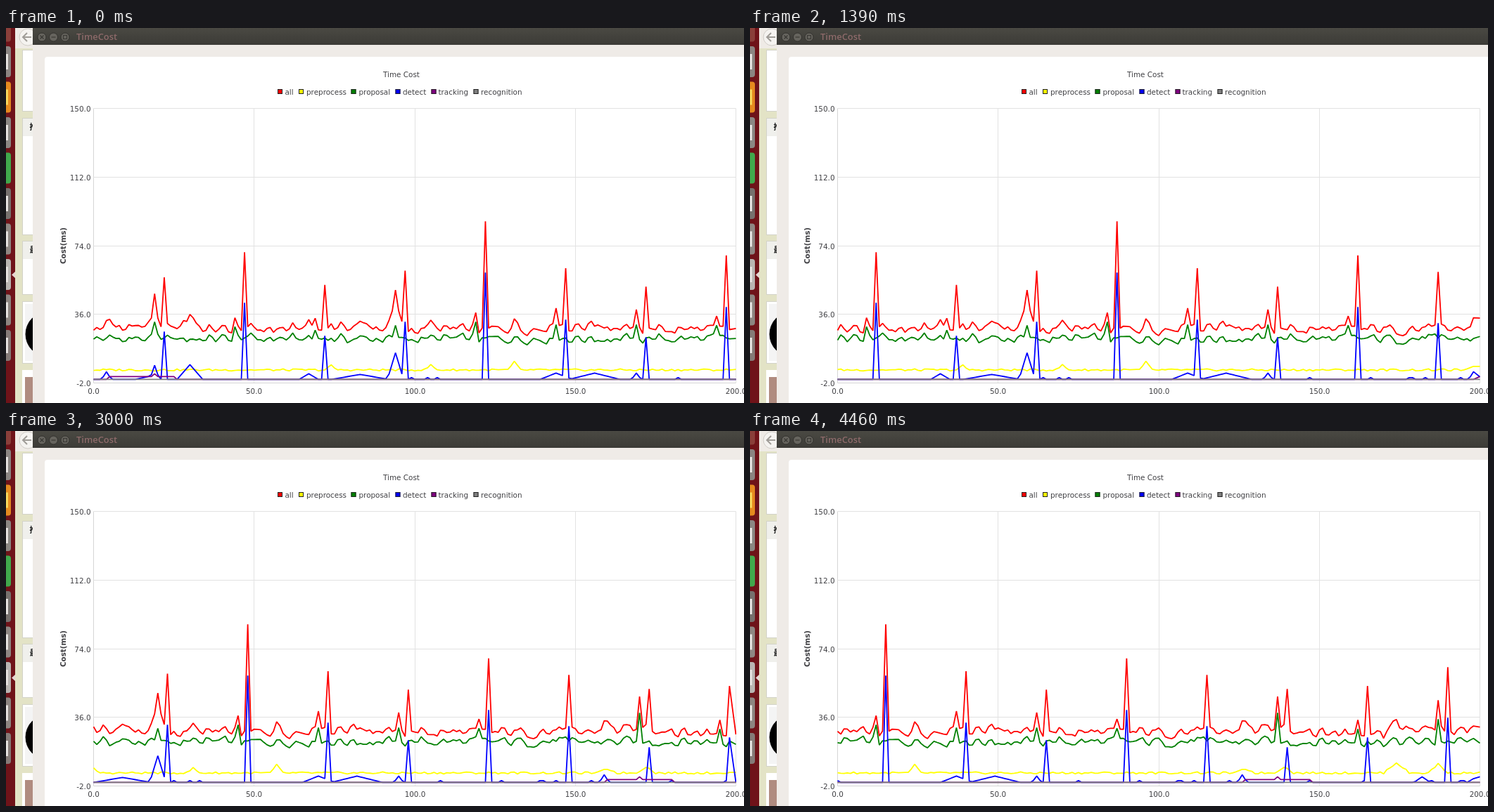
An HTML page with a canvas that plays this animation: 1049 by 534 pixels, repeating every 4.53 s.

```html
<!DOCTYPE html>
<html lang="en">
<head>
<meta charset="utf-8">
<title>TimeCost</title>
<style>
html, body { margin: 0; width: 100%; height: 100%; overflow: hidden; background: #fff; }
canvas { display: block; }
</style>
</head>
<body>
<canvas id="stage" width="1049" height="534"></canvas>
<script>
const ctx = document.getElementById('stage').getContext('2d');
const LOOP = 4530, SHOWN = 200, SCROLLED = 107, TOTAL = SHOWN + SCROLLED;
const LEFT = 124.5, RIGHT = 1037.5, TOP = 114.5, BOTTOM = 505.5, ZERO = 500.4;
const STEP = (RIGHT - LEFT) / 200;
const SANS = '"DejaVu Sans", sans-serif';
const CJK = 'bold 11px "Noto Sans CJK SC", "Noto Sans CJK", sans-serif';

// [time in ms, samples scrolled by then]
const scroll = [[0, 0], [40, 1], [870, 24], [1870, 47], [3000, 74], [3950, 96], [4460, SCROLLED]];

function scrolledAt(t) {
  const j = scroll.findIndex(k => t < k[0]);
  if (j < 0) return SCROLLED;
  const [t0, s0] = scroll[j - 1], [t1, s1] = scroll[j];
  return Math.floor(s0 + (s1 - s0) * (t - t0) / (t1 - t0) + 0.01);
}

// repeatable noise in -1..1
function noise(i, seed) {
  const v = Math.sin(i * 12.9898 + seed * 78.233) * 43758.5453;
  return (v - Math.floor(v)) * 2 - 1;
}

// Sample heights are in pixels above the zero line.
// Every 25 samples a full detection runs, three samples after a slow proposal.
const proposalPeaks = [82, 75, 70, 77, 82, 78, 78, 77, 64, 99, 76, 90];
const detectPeaks = [68, 109, 62, 82, 152, 85, 60, 103, 80, 50, 64, 92];

// [centre, half width, height]
const detectBumps = [[4, 1.5, 11], [17, 4, 4], [19, 1.5, 20], [30, 4, 21], [67, 3, 8], [83, 9, 7],
  [94, 2.5, 38], [144, 5, 9], [156, 8, 9], [169, 1.5, 9], [233, 1.5, 11], [289, 2.5, 8], [306, 3, 8]];
const preprocessBumps = [[74, 2, 6], [105, 2, 7], [131, 2, 11], [234, 3, 6], [246, 3, 9],
  [281, 4, 15], [294, 3, 13]];

function bump(list, i) {
  return Math.max(0, ...list.map(([c, w, h]) => h * (1 - Math.abs(i - c) / w)));
}

function proposal(i) {
  if (i % 25 === 19) return proposalPeaks[(i - 19) / 25];
  if (i % 25 === 22) return 59;
  return 58 + 4.5 * (noise(i, 1) + noise(i + 1, 1));
}

function detect(i) {
  if (i % 25 === 22) return detectPeaks[(i - 22) / 25];
  const idle = i > 98 && noise(i, 2) > 0.85 ? 2.5 : 0;
  return Math.max(idle, bump(detectBumps, i));
}

function tracking(i) {
  const k = i < 200 ? i - 15 : i - 244;
  if (Math.abs(k) > 10) return 0;
  return k === 0 && i > 200 || i === 19 ? 8 : 4;
}

const series = { all: [], preprocess: [], proposal: [], detect: [], tracking: [], recognition: [] };
for (let i = 0; i < TOTAL; i++) {
  const parts = {
    preprocess: 13.5 + 1.5 * noise(i, 3) + bump(preprocessBumps, i),
    proposal: proposal(i), detect: detect(i), tracking: tracking(i), recognition: 0
  };
  let sum = 0;
  for (const name in parts) {
    series[name].push(parts[name]);
    sum += parts[name];
  }
  series.all.push(sum);
}

// name, colour, marker centre, label start
const legend = [
  ['all', '#ff0000', 390, 396.5], ['preprocess', '#ffff00', 420, 427],
  ['proposal', '#008000', 494.5, 501.5], ['detect', '#0000ff', 557.5, 564],
  ['tracking', '#800080', 608.5, 614.5], ['recognition', '#808080', 668.5, 675]
];

function rect(x, y, w, h, color) {
  ctx.fillStyle = color;
  ctx.fillRect(x, y, w, h);
}

function roundRect(x, y, w, h, color) {
  ctx.fillStyle = color;
  ctx.beginPath();
  ctx.roundRect(x, y, w, h, 4);
  ctx.fill();
}

function disc(x, y, r, fill, stroke = fill) {
  ctx.beginPath();
  ctx.arc(x, y, r, 0, 7);
  ctx.fillStyle = fill;
  ctx.fill();
  ctx.strokeStyle = stroke;
  ctx.lineWidth = 1;
  ctx.stroke();
}

function line(color, width, ...p) {
  ctx.beginPath();
  for (let j = 0; j < p.length; j += 2) ctx.lineTo(p[j], p[j + 1]);
  ctx.strokeStyle = color;
  ctx.lineWidth = width;
  ctx.stroke();
}

function text(s, x, y, align = 'left', font = '10.4px ' + SANS, color = '#404044') {
  ctx.font = font;
  ctx.textAlign = align;
  ctx.fillStyle = color;
  ctx.fillText(s, x, y);
}

function drawDesktop() {
  rect(13, 0, 25, 534, '#e3e3c6');
  rect(13, 0, 25, 29, '#efebe6');
  disc(31, 13, 12, '#f5f3f0', '#d0ccc6');
  line('#a09d98', 2, 30, 7, 24, 13, 30, 19);
  line('#a09d98', 2, 24, 13, 36, 13);
  for (const [y, h] of [[31, 88], [128, 167], [303, 77], [389, 89]]) {
    rect(23, y, 15, h, '#d3d3c9');
    rect(24, y + 1, 14, h - 2, '#fff');
  }
  for (const [y, glyph] of [[129, '推'], [304, '最']]) {
    rect(24, y, 14, 25, '#f0f0ec');
    text(glyph, 33.5, y + 16, 'left', CJK, '#222');
  }
  rect(23, 487, 15, 47, '#fff');
  rect(27, 393, 11, 81, '#f4f4f4');
  disc(60, 436, 32, '#000');
  rect(27, 497, 11, 37, '#b08c80');
}

function drawLauncher() {
  rect(0, 0, 13, 534, '#6f1319');
  const tiles = ['#8a3f3a', '#8b8582', '#e58a1f', '#8b8783', '#41a94c', '#77716e',
    '#8f8783', '#b9b5b2', '#8d8581', '#857b78'];
  tiles.forEach((color, k) => {
    const y = -24.5 + 50.5 * k;
    roundRect(-20, y, 27, 44, color);
    if (k && k !== 4) rect(0, y + 11, 3, 22, k === 2 ? '#f7d75c' : '#e4e1df');
  });
  ctx.fillStyle = '#e6d5d2';
  ctx.beginPath();
  ctx.moveTo(13, 347);
  ctx.lineTo(8, 351.5);
  ctx.lineTo(13, 356);
  ctx.fill();
}

function drawWindow() {
  rect(38, 0, 1011, 534, '#efebe7');
  const bar = ctx.createLinearGradient(0, 0, 0, 24);
  bar.addColorStop(0, '#4a4943');
  bar.addColorStop(1, '#3c3b37');
  rect(38, 0, 1011, 24, bar);
  for (const x of [51, 67.5, 84]) disc(x, 13, 6, '#66645e', '#33322e');
  line('#3a3935', 1.2, 48.5, 10.5, 53.5, 15.5);
  line('#3a3935', 1.2, 53.5, 10.5, 48.5, 15.5);
  line('#3a3935', 1.2, 64.5, 13, 70.5, 13);
  ctx.strokeRect(81.5, 10.5, 5, 5);
  text('TimeCost', 100, 17, 'left', '600 12.9px "Open Sans", sans-serif', '#8d6a6a');
  roundRect(55, 41, 1020, 520, '#fff');
}

function drawAxes() {
  for (let k = 0; k < 5; k++) {
    const x = Math.round(LEFT + k * 228.25 - 0.5) + 0.5;
    const y = Math.round(TOP + k * 97.75 - 0.5) + 0.5;
    line(k ? '#e2e2e2' : '#d6d6d6', 1, x, TOP, x, BOTTOM);
    line(k < 4 ? '#e2e2e2' : '#d6d6d6', 1, LEFT, y, RIGHT, y);
    text((150 - 38 * k).toFixed(1), 120.5, y + 4, 'right');
    text((50 * k).toFixed(1), x, 520.5, 'center');
  }
  text('Time Cost', 562, 69.5, 'center');
  ctx.save();
  ctx.translate(85, 310);
  ctx.rotate(-Math.PI / 2);
  text('Cost(ms)', 0, 0, 'center', 'bold 10.3px ' + SANS);
  ctx.restore();
  for (const [name, color, x, labelX] of legend) {
    rect(x - 4, 87, 7, 7, color);
    ctx.strokeStyle = '#222';
    ctx.lineWidth = 1;
    ctx.strokeRect(x - 3.5, 87.5, 6, 6);
    text(name, labelX, 94.5);
  }
}

function drawSeries(shift) {
  ctx.save();
  ctx.beginPath();
  ctx.rect(124, 114, 914, 392);
  ctx.clip();
  ctx.lineJoin = 'bevel';
  for (const [name, color] of legend) {
    const pts = [];
    for (let i = 0; i < SHOWN; i++) {
      // the newest sample always sits on the right edge
      const pos = i === SHOWN - 1 ? 200 : i;
      pts.push(LEFT + pos * STEP, ZERO - series[name][i + shift]);
    }
    line(color, 1.8, ...pts);
  }
  ctx.restore();
}

function draw(t) {
  drawDesktop();
  drawLauncher();
  drawWindow();
  drawAxes();
  drawSeries(scrolledAt(t));
}

const start = performance.now();
function tick() {
  draw((performance.now() - start) % LOOP);
  requestAnimationFrame(tick);
}
tick();
</script>
</body>
</html>
```
